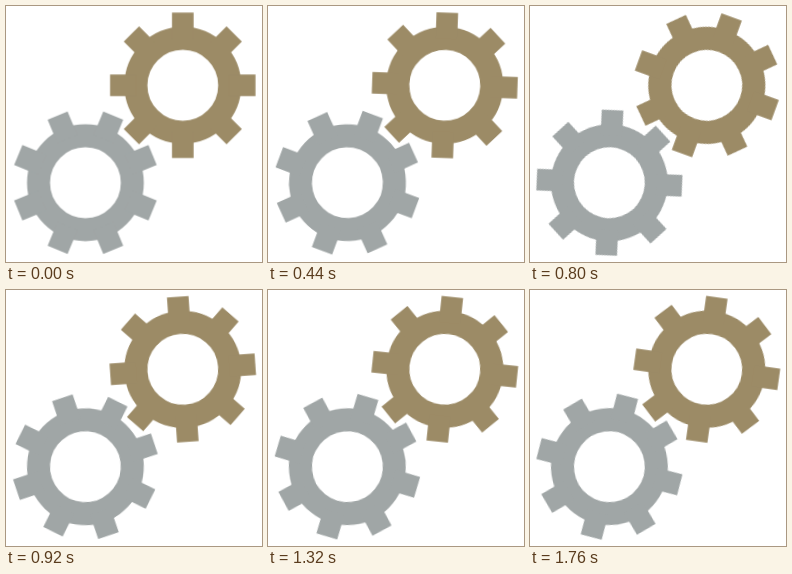
Write an HTML page that moves like this. It is 256 by 256 pixels and loops after 1800 ms.

```html
<!DOCTYPE html>
<html lang="en">
<head>
<meta charset="utf-8">
<title>Gears</title>
<style>
  html, body { margin: 0; width: 100%; height: 100%; overflow: hidden; background: #fff; }
  svg { display: block; width: 100vw; height: 100vh; }
  .wheel { transform-origin: 0 0; }
</style>
</head>
<body>
<svg viewBox="0 0 256 256"></svg>
<script>
  const NS = 'http://www.w3.org/2000/svg';
  const LOOP = 1800, STEPS = 45, TEETH = 8;
  const RIM = 46.9, RIM_WIDTH = 23, TIP = 72.7, TOOTH = 21.6;

  const gears = [
    { x: 79.4, y: 176.7, color: '#a0a6a6', start: 22.5, turn: 360 },
    { x: 176.8, y: 79.3, color: '#9c8b66', start: 0, turn: -360 }
  ];

  function add(parent, tag, attrs) {
    const el = document.createElementNS(NS, tag);
    for (const key in attrs) el.setAttribute(key, attrs[key]);
    return parent.appendChild(el);
  }

  function addGear(svg, { x, y, color, start, turn }) {
    const place = add(svg, 'g', { transform: `translate(${x} ${y})` });
    const wheel = add(place, 'g', { class: 'wheel' });
    add(wheel, 'circle', { r: RIM, fill: 'none', stroke: color, 'stroke-width': RIM_WIDTH });
    for (let i = 0; i < TEETH; i++) {
      add(wheel, 'rect', {
        x: -TOOTH / 2, y: -TIP, width: TOOTH, height: TIP - RIM, fill: color,
        transform: `rotate(${start + i * 360 / TEETH})`
      });
    }
    wheel.animate(
      [{ transform: 'rotate(0deg)', easing: `steps(${STEPS})` }, { transform: `rotate(${turn}deg)` }],
      { duration: LOOP, iterations: Infinity }
    );
  }

  const svg = document.querySelector('svg');
  gears.forEach(gear => addGear(svg, gear));
</script>
</body>
</html>
```
